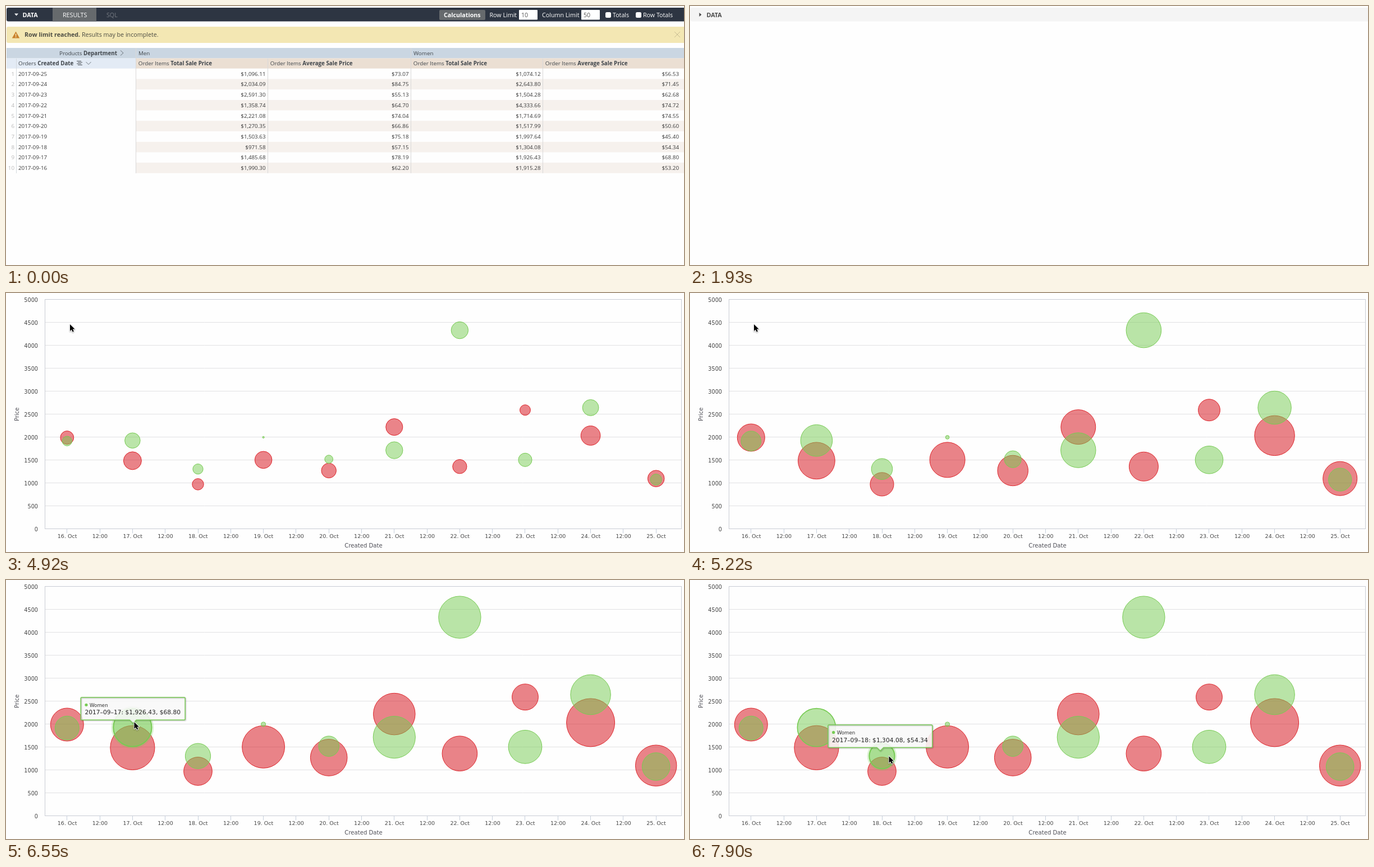
Recreate the animation shown at these times as an HTML page with a canvas. Size 1208 px wide and 463 px high, loop 8000 ms.

```html
<!DOCTYPE html>
<html lang="en">
<head>
<meta charset="utf-8">
<title>Table to bubble chart</title>
<style>
  html, body { margin: 0; width: 100%; height: 100%; overflow: hidden; background: #fefefe; }
  canvas { display: block; }
</style>
</head>
<body>
<canvas id="stage" width="1208" height="463"></canvas>
<script>
const W = 1208, H = 463, LOOP = 8000, TICK = 146;
const ctx = document.getElementById('stage').getContext('2d');
const UI = '"Open Sans", sans-serif', CHART = '"DejaVu Sans", sans-serif';
const RED = '214,10,20', GREEN = '119,203,83';
const INK = '#3f454b', BAR = '#2d3542', TAB = '#666a6d';

// The data set behind table, chart and tooltip, newest day first:
// men total, men average, women total, women average
const ROWS = [
  [1096.11, 73.07, 1074.12, 56.53],
  [2034.09, 84.75, 2643.80, 71.45],
  [2591.30, 55.13, 1504.28, 62.68],
  [1358.74, 64.70, 4333.66, 74.72],
  [2221.08, 74.04, 1714.69, 74.55],
  [1270.35, 66.86, 1517.99, 50.60],
  [1503.63, 75.18, 1997.64, 45.40],
  [971.58, 57.15, 1304.08, 54.34],
  [1485.68, 78.19, 1926.43, 68.80],
  [1990.30, 62.20, 1915.28, 53.20]
];
const averages = ROWS.flatMap(r => [r[1], r[3]]);
const LOW = Math.min(...averages), HIGH = Math.max(...averages);

const money = v => '$' + v.toLocaleString('en-US', { minimumFractionDigits: 2 });
const mix = (a, b, k) => a + (b - a) * k;
const ticks = (t, from) => Math.floor((t - from) / TICK);

function rect(x, y, w, h, color, radius = 0) {
  ctx.fillStyle = color;
  ctx.beginPath();
  ctx.roundRect(x, y, w, h, radius);
  ctx.fill();
}

function trace(points) {
  ctx.beginPath();
  for (let i = 0; i < points.length; i += 2) ctx.lineTo(points[i], points[i + 1]);
}

function line(color, ...points) {
  ctx.strokeStyle = color;
  ctx.lineWidth = 1;
  trace(points);
  ctx.stroke();
}

function poly(color, ...points) {
  ctx.fillStyle = color;
  trace(points);
  ctx.fill();
}

function text(s, x, y, size, color, { bold = false, align = 'left', face = UI } = {}) {
  ctx.font = `${bold ? 'bold ' : ''}${size}px ${face}`;
  ctx.textAlign = align;
  ctx.fillStyle = color;
  ctx.fillText(s, x, y);
  return x + ctx.measureText(s).width;
}

function pair(plain, bold, x, y) {
  const end = text(plain + ' ', x, y, 9.8, INK);
  text(bold, end, y, 9.8, INK, { bold: true });
}

const bar = color => rect(1, 3, W, 24.6, color, [3, 0, 0, 3]);

function drawToolbar() {
  const label = (s, x, color = '#fff', bold) => text(s, x, 19.5, 10.7, color, { bold });
  bar(BAR);
  rect(83, 3, 78, 24.6, TAB);
  poly('#fff', 15, 13.5, 22, 13.5, 18.5, 17.5);
  label('DATA', 29.5, '#fff', true);
  label('RESULTS', 101);
  label('SQL', 179, '#777c84');
  rect(772, 7, 82, 18, TAB, 2);
  label('Calculations', 780, '#fff', true);
  const field = (s, x, value, boxX) => {
    label(s, x);
    rect(boxX, 7, 33, 17.5, '#fff', 1);
    text(value, boxX + 4, 20, 10.7, '#555');
  };
  field('Row Limit', 861.5, 10, 914);
  field('Column Limit', 955, 50, 1025);
  const check = (s, x) => {
    rect(x, 11, 10, 10, '#fff', 2.5);
    label(s, x + 13);
  };
  check('Totals', 1068);
  check('Row Totals', 1122);
}

function drawAlert() {
  rect(1, 37, W, 29, '#f3e7b3', [3, 0, 0, 3]);
  poly('#c9822b', 17.5, 45.5, 24.2, 57.5, 10.8, 57.5);
  rect(16.8, 49.5, 1.5, 4, '#f8eec8');
  rect(16.8, 54.5, 1.5, 1.5, '#f8eec8');
  const end = text('Row limit reached. ', 33, 55, 10.7, '#4b4b42', { bold: true });
  text('Results may be incomplete.', end, 55, 10.7, '#4b4b42');
  line('#c8bd92', 1191, 46, 1201, 56);
  line('#c8bd92', 1201, 46, 1191, 56);
}

// Left edge of value column j: two groups of two columns
const edge = j => 231.5 + 490 * (j >> 1) + 235 * (j % 2);

function drawTable() {
  const right = { align: 'right' };
  rect(1, 75, W, 18.5, '#cad6e2');
  rect(1, 93.5, 231, 18.3, '#e3ebf5');
  rect(232, 93.5, W, 18.3, '#ebdfd3');
  pair('Products', 'Department', 95, 87.5);
  line('#6b747c', 204, 79.5, 209, 84, 204, 88.5);
  pair('Orders', 'Created Date', 22, 106);
  for (let i = 0; i < 4; i++) {
    const x = 126 + i % 2 * 2, y = 98.5 + i * 2.3;
    line('#50565c', x, y, x + 8, y);
  }
  line('#6b747c', 142.5, 100, 147, 104.5, 151.5, 100);

  ROWS.forEach((row, i) => {
    const top = 111.8 + i * 18.7, base = top + 12.9;
    if (i % 2) rect(232, top, W, 18.7, '#f6f1ed');
    text(i + 1, 15, base, 9.8, '#b9b9b9', right);
    text('2017-09-' + (25 - i), 22, base, 9.8, '#3a3a3a');
    row.forEach((v, j) =>
      text(money(v), Math.min(edge(j + 1) - 4, 1199), base, 9.8, '#3a3a3a', right));
  });

  line('#d5d9de', 18.5, 94, 18.5, 299);
  for (let j = 0; j < 4; j++) {
    const x = edge(j), first = j % 2 === 0;
    if (first) text(j ? 'Women' : 'Men', x + 4.5, 87.5, 9.8, INK);
    pair('Order Items', first ? 'Total Sale Price' : 'Average Sale Price', x + 4.3, 106);
    line('#dad9d9', x, first ? 75 : 94, x, 299);
  }
}

function drawCollapsed(fade) {
  bar('#f4f4f4');
  poly('#4a4a4a', 16.5, 12, 20.5, 15.5, 16.5, 19);
  text('DATA', 29.5, 19.5, 10.7, '#4a4a4a', { bold: true });
  ctx.globalAlpha = fade;
  bar(BAR);
  ctx.globalAlpha = 1;
}

const SMALL = { bottom: 309.5, max: 6000, step: 1000, x0: 101.8, dx: 118.33, rMax: 31.5 };
const LARGE = { bottom: 421.5, max: 5000, step: 500, x0: 108.8, dx: 116.6, rMax: 43 };

const yOf = (c, v) => mix(c.bottom, 12, v / c.max);

// Area grows with the average price
function bubble(c, day, women) {
  const [total, average] = ROWS[25 - day].slice(women ? 2 : 0);
  return {
    x: c.x0 + (day - 16) * c.dx,
    y: yOf(c, total),
    r: mix(4, c.rMax, Math.sqrt((average - LOW) / (HIGH - LOW)))
  };
}

function disc({ x, y, r }, rgb, alpha, width) {
  ctx.beginPath();
  ctx.arc(x, y, Math.max(r, 0), 0, 7);
  ctx.fillStyle = `rgba(${rgb},${alpha})`;
  ctx.fill();
  if (!width) return;
  ctx.strokeStyle = `rgb(${rgb === RED ? '222,36,42' : GREEN})`;
  ctx.lineWidth = width;
  ctx.stroke();
}

function drawChart(c, grow, hover, last) {
  const centered = { face: CHART, align: 'center' };
  for (let v = 0; v <= c.max; v += c.step) {
    const y = yOf(c, v), py = Math.floor(y) + .5;
    if (v && v < c.max) line('#e1e1e3', 70, py, 1204, py);
    text(v, 57, y + 4, 9.7, '#444', { face: CHART, align: 'right' });
  }
  ctx.strokeStyle = '#c9ccd4';
  ctx.lineWidth = 1;
  ctx.strokeRect(69.5, 11.5, 1134, c.bottom - 11.5);
  for (let i = 0; i < 19; i++) {
    const x = c.x0 + i * c.dx / 2, px = Math.floor(x) + .5;
    line('#c6cfdc', px, c.bottom, px, c.bottom + 8);
    text(i % 2 ? '12:00' : 16 + i / 2 + '. Oct', x + .3, c.bottom + 16.5, 9.5, '#444', centered);
  }
  text('Created Date', 637, c.bottom + 33, 10.1, '#4d4d55', centered);
  ctx.save();
  ctx.translate(23, (c.bottom + 12) / 2);
  ctx.rotate(-Math.PI / 2);
  text('Price', 0, 0, 10, '#4d4d55', centered);
  ctx.restore();

  for (const women of [false, true]) {
    const rgb = women ? GREEN : RED;
    for (let day = 16; day <= 25; day++) {
      const b = bubble(c, day, women);
      const on = women && day === hover;
      b.r *= grow;
      if (on) disc({ ...b, r: b.r + 3.8 }, rgb, .25);
      disc(b, rgb, .5, on ? 2 : women && day === last ? 1.6 : 1);
    }
  }
}

function drawTip(day, x, y) {
  const w = 186, h = 40.5, l = x - w / 2, t = y - 54, b = t + h, r = l + w;
  ctx.save();
  ctx.beginPath();
  ctx.moveTo(l + 2, t);
  ctx.arcTo(r, t, r, b, 2);
  ctx.arcTo(r, b, l, b, 2);
  ctx.lineTo(x + 6, b);
  ctx.lineTo(x, b + 6);
  ctx.lineTo(x - 6, b);
  ctx.arcTo(l, b, l, t, 2);
  ctx.arcTo(l, t, r, t, 2);
  ctx.closePath();
  ctx.fillStyle = 'rgba(249,249,249,.88)';
  ctx.fill();
  ctx.shadowColor = 'rgba(0,0,0,.3)';
  ctx.shadowBlur = 2;
  ctx.shadowOffsetX = ctx.shadowOffsetY = 1;
  ctx.strokeStyle = '#7acb57';
  ctx.lineWidth = 1.5;
  ctx.stroke();
  ctx.restore();
  const [, , total, average] = ROWS[25 - day];
  disc({ x: l + 9.8, y: t + 13.5, r: 2.6 }, GREEN, 1);
  text('Women', l + 15.8, t + 17.3, 8.7, '#333', { face: CHART });
  text(`2017–09–${day}: ${money(total)}, ${money(average)}`,
    l + 7.2, t + 30.6, 10.7, '#222', { face: CHART });
}

// Each glide eases out to its goal in a few ticks
const GLIDES = [
  { at: 590, steps: 4, x: 17, y: 14 },
  { at: 4630, steps: 1, x: 114, y: 55 },
  { at: 5810, steps: 2, x: 118, y: 118 },
  { at: 6250, steps: 3, x: 228.5, y: 253 },
  { at: 7150, steps: 6, x: 354.5, y: 314 }
];

function pointerAt(t) {
  let pos = { x: 40, y: -6 };
  for (const g of GLIDES) {
    if (t < g.at) break;
    const p = Math.min(1, (ticks(t, g.at) + 1) / g.steps);
    const k = 1 - (1 - p) ** 2;
    pos = { x: mix(pos.x, g.x, k), y: mix(pos.y, g.y, k) };
  }
  return pos;
}

function drawPointer(t) {
  const { x, y } = pointerAt(t);
  ctx.save();
  ctx.translate(x, y);
  trace([0, 1, 0, 13, 2.8, 10.4, 4.7, 14.6, 6.8, 13.7, 5, 9.6, 8.6, 9.4]);
  ctx.closePath();
  ctx.strokeStyle = '#fff';
  ctx.lineWidth = 1.8;
  ctx.lineJoin = 'round';
  ctx.shadowColor = 'rgba(0,0,0,.35)';
  ctx.shadowBlur = 2;
  ctx.shadowOffsetY = 1;
  ctx.stroke();
  ctx.shadowColor = 'transparent';
  ctx.fillStyle = '#000';
  ctx.fill();
  ctx.restore();
}

function drawHover(t) {
  const hover = t < 6400 ? 0 : t < 7600 ? 17 : 18;
  drawChart(LARGE, 1, hover, hover === 18 ? 17 : 0);
  if (!hover) return;
  const a = bubble(LARGE, 17, true), b = bubble(LARGE, 18, true);
  // The tip closes a third of the gap about every 35 ms
  const k = hover === 17 ? 0 : 1 - (2 / 3) ** (ticks(t, 7600) * TICK / 35);
  drawTip(hover, mix(a.x, b.x, k) + .8, mix(a.y, b.y, k));
}

function draw(t) {
  rect(0, 0, W, H, '#fefefe');
  if (t < 1790) {
    drawToolbar();
    drawAlert();
    drawTable();
  } else if (t < 4480) {
    drawCollapsed(t < 1930 ? .4 : 0);
  } else if (t < 4630) {
    drawChart(SMALL, 1);
  } else if (t < 5510) {
    const p = ticks(t, 4480) * TICK / 1000;
    drawChart(LARGE, .5 - Math.cos(p * Math.PI) / 2);
  } else {
    drawHover(t);
  }
  if (t >= 590 && t < 1930 || t >= 4630) drawPointer(t);
}

const start = performance.now();
function frame() {
  draw((performance.now() - start) % LOOP);
  requestAnimationFrame(frame);
}
frame();
</script>
</body>
</html>
```
